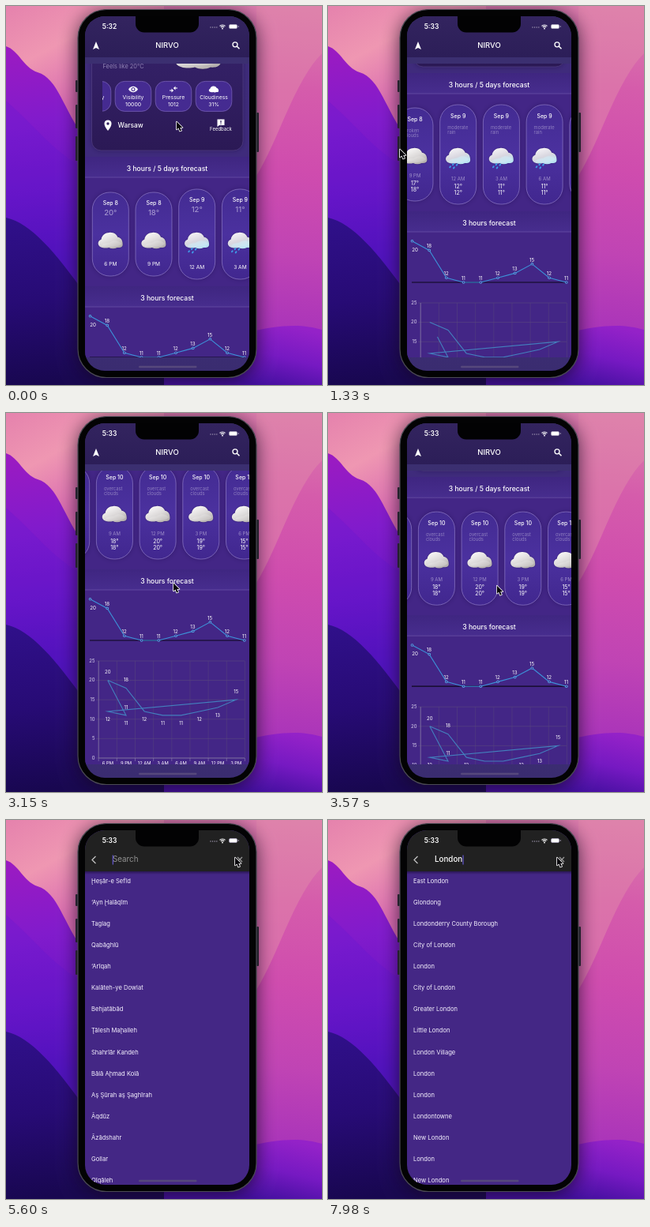
An HTML page with a canvas for the animation above (8000 ms loop, 400x480 px).

```html
<!DOCTYPE html>
<html lang="en">
<head>
<meta charset="utf-8">
<title>Weather app</title>
<style>
html, body { margin: 0; width: 100%; height: 100%; overflow: hidden; background: #000; }
canvas { display: block; width: 400px; height: 480px; }
</style>
</head>
<body>
<canvas id="stage" width="400" height="480"></canvas>
<script>
const c = document.getElementById('stage').getContext('2d');
const LOOP = 8000, PITCH = 54.7;

const temps = [20, 18, 12, 11, 11, 12, 13, 15, 12, 11, 11, 11, 14, 18, 20, 19, 15, 13];
const cities = ['Ḩeşār-e Sefīd', '‘Ayn Ḩalāqīm', 'Taglag', 'Qabāghlū', '‘Arīqah', 'Kalāteh-ye Dowlat',
  'Behjatābād', 'Ţālesh Maḩalleh', 'Shahrīār Kandeh', 'Bālā Aḩmad Kolā', 'Aş Şūrah aş Şaghīrah',
  'Āqdūz', 'Āzādshahr', 'Gollar', 'Qīqāleh', 'East London', 'Glondong', 'Londonderry County Borough',
  'City of London', 'London', 'City of London', 'Greater London', 'Little London', 'London Village',
  'London', 'London', 'Londontowne', 'New London', 'London', 'New London'];

// Timelines: [time, value]
const pageScroll = [[120, 110], [620, 216], [2500, 216], [2950, 278], [3350, 278], [4100, 0]];
const cardScroll = [[950, 0], [1330, 77], [2000, 706]];
const cardExpand = [[640, 0], [900, 1]];
const searchFade = [[4850, 0], [5100, 1]];
const pointerX = [[400, 216], [900, 170], [1330, 91], [1650, 230], [2000, 182], [2100, 182], [3100, 212], [4100, 216], [4600, 290]];
const pointerY = [[400, 152], [900, 190], [1330, 187], [1650, 190], [2000, 192], [2100, 192], [3100, 221], [4100, 228], [4600, 53]];

const clamp = v => Math.max(0, Math.min(1, v));

function at(keys, t) {
  if (t <= keys[0][0]) return keys[0][1];
  for (let i = 1; i < keys.length; i++) {
    const [t0, a] = keys[i - 1], [t1, b] = keys[i];
    if (t < t1) {
      const k = (t - t0) / (t1 - t0);
      return a + (b - a) * k * k * (3 - 2 * k);
    }
  }
  return keys[keys.length - 1][1];
}

function text(s, x, y, size, color = '#fff', align = 'center', weight = 400) {
  c.font = `${weight} ${size}px Inter, sans-serif`;
  c.fillStyle = color;
  c.textAlign = align;
  c.textBaseline = 'middle';
  c.fillText(s, x, y);
}

function gradient(x0, y0, x1, y1, ...colors) {
  const g = c.createLinearGradient(x0, y0, x1, y1);
  colors.forEach((color, i) => g.addColorStop(i / (colors.length - 1), color));
  return g;
}

function box(x, y, w, h, r, fill, stroke, width = 0.8) {
  c.beginPath();
  c.roundRect(x, y, w, h, r);
  if (fill) { c.fillStyle = fill; c.fill(); }
  if (stroke) { c.strokeStyle = stroke; c.lineWidth = width; c.stroke(); }
}

function line(points, color, width = 1) {
  c.beginPath();
  points.forEach(([x, y]) => c.lineTo(x, y));
  c.strokeStyle = color;
  c.lineWidth = width;
  c.stroke();
}

function shape(path, fill) {
  c.fillStyle = fill;
  c.fill(new Path2D(path));
}

function disc(x, y, r, fill) {
  c.beginPath();
  c.arc(x, y, r, 0, 7);
  c.fillStyle = fill;
  c.fill();
}

function clipTo(x, y, w, h, r, draw) {
  c.save();
  c.beginPath();
  c.roundRect(x, y, w, h, r);
  c.clip();
  draw();
  c.restore();
}

function placed(x, y, scale, draw) {
  c.save();
  c.translate(x, y);
  c.scale(scale, scale);
  draw();
  c.restore();
}

function withAlpha(alpha, draw) {
  if (alpha <= 0) return;
  c.save();
  c.globalAlpha *= alpha;
  draw();
  c.restore();
}

const CLOUD = 'M-29 10C-31 2 -26 -1 -22 -3C-21 -13 -12 -19 -3 -19C8 -20 15 -14 17 -8C25 -7 29 0 29 8C30 15 24 18 16 17C10 20 2 20 -4 17C-11 19 -26 19 -29 10Z';

function cloud(x, y, scale, rain) {
  placed(x, y, scale, () => {
    c.shadowColor = '#160a3a88';
    c.shadowBlur = 2;
    shape(CLOUD, rain
      ? gradient(-6, -18, 6, 19, '#f2f0f4', '#d9d7e0', '#b9e3f2')
      : gradient(-8, -18, 10, 20, '#f6f4f4', '#dcd9d9', '#b5b0ae'));
    c.shadowBlur = 0;
    shape('M-22 13C-14 3 -6 9 0 4C8 -2 19 0 26 7C24 15 6 17 -22 13Z', rain ? '#d2f1fa66' : '#ffffff30');
    if (!rain) return;
    c.lineCap = 'round';
    [[-19, 26], [-12, 20], [-10, 28], [-3, 21]].forEach(([dx, dy]) => line([[dx + 0.7, dy - 1], [dx - 0.7, dy + 1]], '#3f9be8', 3.6));
  });
}

function wallpaper() {
  c.fillStyle = gradient(0, 0, 70, 130, '#e582ad', '#ef97b2', '#d96bb0');
  c.fillRect(0, 0, 200, 480);
  c.fillStyle = gradient(400, 0, 360, 420, '#dc7fac', '#d55cab', '#cf4cae', '#c044b4', '#a833ba');
  c.fillRect(200, 0, 200, 480);
  shape('M317 215C345 170 365 95 400 60V0H317Z', '#e287ab88');
  shape('M0 51C16 56 22 78 40 84C66 92 72 130 100 168H200V480H0Z', gradient(0, 60, 40, 330, '#9a1bc2', '#811bcc', '#6915c5', '#4c11b4'));
  shape('M0 120C35 150 65 190 100 205V400H0Z', '#5716cf33');
  shape('M0 268C32 275 62 312 100 364H200V480H0Z', gradient(0, 270, 30, 480, '#30108a', '#270b75', '#180750'));
  shape('M200 450C320 401 365 400 400 410V480H200Z', gradient(340, 400, 320, 480, '#9422c8', '#7619c2', '#430f9e'));
}

function phoneBody() {
  c.save();
  c.shadowColor = '#14061fc0';
  c.shadowBlur = 24;
  c.shadowOffsetY = 3;
  box(91, 4.5, 226, 466, 36, '#000');
  c.restore();
  [[94, 15], [125, 30], [165, 31]].forEach(([y, h]) => box(88, y, 3, h, 1, '#24202c'));
  box(317, 135, 3, 50, 1, '#24202c');
  box(91, 4.5, 226, 466, 36, '#030304', '#4b4a54', 1.2);
}

function sectionTitle(label, y) {
  c.fillStyle = gradient(0, y - 15, 0, y + 11, '#3f2681', '#472d8e');
  c.fillRect(100, y - 15, 208, 26);
  line([[100, y + 11], [308, y + 11]], '#6750a5', 0.8);
  text(label, 204, y, 8.65, '#fff', 'center', 500);
}

const chipIcons = {
  Humidity() {},
  Visibility() {
    shape('M-6 0C-3 -5 3 -5 6 0C3 5 -3 5 -6 0Z', '#fff');
    disc(0, 0, 2.5, '#452b91');
    disc(0, 0, 1.4, '#fff');
  },
  Pressure() {
    line([[-5, 1.5], [-0.5, 1.5]], '#fff');
    line([[5, -1.5], [0.5, -1.5]], '#fff');
    shape('M-2.5 -1L0 1.5L-2.5 4ZM2.5 -4L0 -1.5L2.5 1Z', '#fff');
  },
  Cloudiness() { placed(0, 0, 0.21, () => shape(CLOUD, '#fff')); }
};

function todayPanel(top) {
  text('Warsaw', 203.5, top + 83.3, 13.5, '#fff', 'center', 500);
  text('scattered clouds', 204, top + 99, 11, '#9184b9');
  c.save();
  c.shadowColor = '#1c0e4488';
  c.shadowBlur = 6;
  box(108.5, top + 111, 191.5, 182, 12, gradient(0, top + 111, 0, top + 293, '#38246e', '#321f63', '#2b1955'));
  c.restore();
  box(108.5, top + 111, 191.5, 182, 12, null, '#5a458a', 0.6);
  text('Today', 122.5, top + 132, 9.1, '#fff', 'left', 600);
  text('Thursday, September 8', 286, top + 132, 7.6, '#fff', 'right');
  text('20', 122.5, top + 164, 33, '#fff', 'left', 600);
  text('°C', 166, top + 156, 14, '#f7b41f', 'left', 600);
  text('Feels like 20°C', 122.5, top + 186.5, 7.4, '#9184b5', 'left');
  cloud(243, top + 170.5, 1, false);

  clipTo(122, top + 200, 165, 50, 0, () => {
    [['Humidity', '64%'], ['Visibility', '10000'], ['Pressure', '1012'], ['Cloudiness', '31%']].forEach(([label, value], i) => {
      const x = 110 + i * 51;
      box(x - 22.8, top + 205.4, 45.6, 38, 12, '#452b91', '#765fb5');
      placed(x, top + 215.5, 1, chipIcons[label]);
      text(label, x, top + 226, 6.8);
      text(value, x, top + 234.5, 6.8);
    });
  });

  placed(129, top + 261, 1, () => {
    shape('M0 7C-7 -1 -5 -6.500 0 -6.500C5 -6.500 7 -1 0 7Z', '#fff');
    disc(0, -2, 1.7, '#2f1c5c');
  });
  text('Warsaw', 141.5, top + 261.5, 8.4, '#fff', 'left', 500);
  placed(272, top + 258, 1, () => {
    shape('M-4.500 -4.500H4.500V3H-2L-4.500 5Z', '#fff');
    line([[0, -3], [0, 0]], '#302060', 1.2);
    line([[0, 0.8], [0, 2]], '#302060', 1.2);
  });
  text('Feedback', 272, top + 266.5, 6);
}

function forecastCard(i, x, top, expand) {
  const rain = i >= 2 && i <= 4;
  const spread = rain ? 4 : 0;
  const half = 53 + 6 * expand + spread;
  const mid = top + 399 + 5 * expand;
  const slot = i + 6;
  const hour = slot % 8 * 3;
  const temp = temps[i] + '°';
  c.save();
  c.shadowColor = '#25105c99';
  c.shadowBlur = 7;
  box(x - 23, mid - half, 46, half * 2, 22, gradient(0, mid - half, 0, mid + half, '#432b92', '#4b319f', '#41278f'));
  c.restore();
  box(x - 23, mid - half, 46, half * 2, 22, null, '#8772c2');
  text('Sep ' + (8 + Math.floor(slot / 8)), x, mid - 39 - 5.5 * expand - spread, 7, '#fff', 'center', 500);
  cloud(x, top + 407 - expand, 0.53, rain);
  const hourY = mid + 38 - 11 * expand + spread;
  text(`${hour % 12 || 12} ${hour < 12 ? 'AM' : 'PM'}`, x, hourY, 6.6 - 0.6 * expand, expand > 0.5 ? '#9d8dc9' : '#fff');
  withAlpha(1 - expand, () => text(temp, x, mid - 27 - spread, 9.5, '#a394ce', 'center', 500));
  withAlpha(expand, () => {
    const words = rain ? ['moderate', 'rain'] : [i < 2 ? 'broken' : 'overcast', 'clouds'];
    words.forEach((word, n) => text(word, x - 13.5, mid - 30 + n * 6.5 - spread, 5.8, '#8f7fc0', 'left'));
    text(i === 1 ? '17°' : temp, x, mid + 37 + spread, 7);
    text(temp, x, mid + 45 + spread, 7);
  });
}

function sparkChart(base) {
  const points = temps.slice(0, 10).map((v, i) => [106.5 + i * 21.7, base - (v - 11) * 5.8]);
  line([[106, base], [302, base]], '#0d071c', 1.2);
  line(points, '#3c91d8', 1.1);
  points.forEach(([x, y], i) => {
    disc(x, y, 1.8, '#55a8e5');
    disc(x, y, 0.9, '#432685');
    if (i) text(temps[i], x - 0.3, y - 5, 6.2);
    else text(temps[i], x + 3.5, y + 11, 6.2);
  });
}

function gridChart(top, progress, labels) {
  const px = i => 128.8 + i * 23.2;
  const py = v => top + (25 - v) * 4.92;
  for (let v = 0; v <= 25; v += 5) {
    line([[114, py(v)], [302, py(v)]], '#59477d', 0.6);
    text(v, 112.5, py(v), 6, '#ddd6ee', 'right');
  }
  for (let i = 0; i <= 8; i++) {
    const x = 117.2 + i * 23.15;
    line([[x, top], [x, py(0)]], '#59477d', 0.5);
    line([[x, py(0)], [x, py(0) + 4]], '#8f80b2', 0.6);
  }
  line([[117.2, top], [117.2, py(0)], [302, py(0)]], '#8f80b2', 0.7);
  ['6 PM', '9 PM', '12 AM', '3 AM', '6 AM', '9 AM', '12 PM', '3 PM'].forEach((s, i) => text(s, px(i), py(0) + 7.5, 5.8));

  const points = temps.slice(0, 10).map((v, i) => [px(i % 8), py(v)]);
  points.push(points[0]);
  c.save();
  c.setLineDash([419 * progress, 999]);
  line(points, '#437fbd', 1.1);
  c.restore();
  withAlpha(labels, () => {
    points.slice(0, 10).forEach(([x, y], i) => text(temps[i], x, y + (i < 2 || i === 7 ? -10 : 10), 6));
    text('11', points[9][0], points[9][1] - 10, 6);
  });
}

function weatherPage(t) {
  const top = -at(pageScroll, t);
  const expand = at(cardExpand, t);
  const slide = at(cardScroll, t);
  const chartTitle = top + 480 + 11 * expand;
  c.fillStyle = gradient(0, 65, 0, 462, '#3b2f70', '#423080', '#3a2c70');
  c.fillRect(100, 13, 208, 449);
  clipTo(100, 73, 208, 372, 0, () => {
    c.fillStyle = gradient(0, top + 65, 0, top + 300, '#3e2d78', '#3f2b7c');
    c.fillRect(100, top + 65, 208, 236);
    c.fillStyle = '#432686';
    c.fillRect(100, top + 301, 208, 600);
    todayPanel(top);
    sectionTitle('3 hours / 5 days forecast', top + 316);
    temps.forEach((_, i) => {
      const x = 132.3 + i * PITCH - slide;
      if (x > 70 && x < 340) forecastCard(i, x, top, expand);
    });
    sectionTitle('3 hours forecast', chartTitle);
    sparkChart(chartTitle + 75);
    gridChart(chartTitle + 101, clamp((t - 350) / 1032), clamp((t - 2300) / 300));
  });

  c.fillStyle = gradient(0, 13, 0, 65, '#33245f', '#2c1e58');
  c.fillRect(100, 13, 208, 52);
  shape('M114 45L118 55L114 53L110 55Z', '#fff');
  text('NIRVO', 204, 50.5, 9.5, '#fff', 'center', 500);
  if (t > 4600) disc(291, 50, 10, '#ffffff0c');
  c.beginPath();
  c.arc(290, 48.8, 3, 0, 7);
  c.strokeStyle = '#fff';
  c.lineWidth = 1.3;
  c.stroke();
  line([[292.2, 51], [295.5, 54.3]], '#fff', 1.5);
}

function searchPage(t) {
  const query = 'London'.slice(0, Math.max(0, Math.floor((t - 6300) / 210) + 1));
  c.fillStyle = '#442785';
  c.fillRect(100, 13, 208, 449);
  cities.filter(name => name.toLowerCase().includes(query.toLowerCase())).slice(0, 15)
    .forEach((name, i) => text(name, 108, 77.5 + i * 27.1, 7.6, '#f6f2ff', 'left'));
  c.fillStyle = '#212121';
  c.fillRect(100, 13, 208, 52);
  c.fillStyle = gradient(0, 65, 0, 69, '#12082a88', '#12082a00');
  c.fillRect(100, 65, 208, 4);
  line([[113.5, 46], [109, 50.5], [113.5, 55]], '#c4c4c4', 1.2);
  text(query || 'Search', 135, 50.5, 9.8, query ? '#fff' : '#929292', 'left', query ? 500 : 400);
  if (Math.floor(t / 500) % 2) {
    const x = 135.3 + (query ? c.measureText(query).width + 0.5 : 0);
    line([[x, 44.5], [x, 56.5]], '#6a5ce0', 1.1);
  }
  line([[293, 47], [299, 53]], '#999', 1.2);
  line([[299, 47], [293, 53]], '#999', 1.2);
}

function statusBar(t) {
  text(t < 640 ? '5:32' : '5:33', 131, 26, 8.5, '#fff', 'center', 600);
  for (let i = 0; i < 4; i++) disc(259 + i * 2.6, 27, 0.65, '#aaa2bb');
  [5, 3].forEach(r => {
    c.beginPath();
    c.arc(274, 29, r, -2.35, -0.79);
    c.strokeStyle = '#fff';
    c.lineWidth = 1.2;
    c.stroke();
  });
  disc(274, 28.4, 1, '#fff');
  box(282.5, 23.5, 10, 5, 1.5, '#fff', '#aaa2bb');
  box(293.6, 25, 1, 2, 0.5, '#aaa2bb');
}

function pointer(x, y) {
  placed(x, y - 5.5, 1, () => {
    const arrow = 'M0 0V10L2.400 8L4 12L6 11.200L4.300 7.500H7.500Z';
    c.lineJoin = 'round';
    c.strokeStyle = '#fff';
    c.lineWidth = 1.6;
    c.stroke(new Path2D(arrow));
    shape(arrow, '#08060c');
  });
}

function frame(now) {
  const t = now % LOOP;
  wallpaper();
  phoneBody();
  clipTo(100, 13, 208, 449, 25, () => {
    const fade = at(searchFade, t);
    if (fade < 1) weatherPage(t);
    withAlpha(fade, () => searchPage(t));
    statusBar(t);
    box(168, 455.8, 73.5, 2.4, 1.2, '#56487c');
    box(164, 3, 80, 30.5, 11, '#020203');
  });
  pointer(at(pointerX, t), at(pointerY, t));
}

const start = performance.now();
function tick() {
  frame(performance.now() - start);
  requestAnimationFrame(tick);
}
tick();
</script>
</body>
</html>
```
